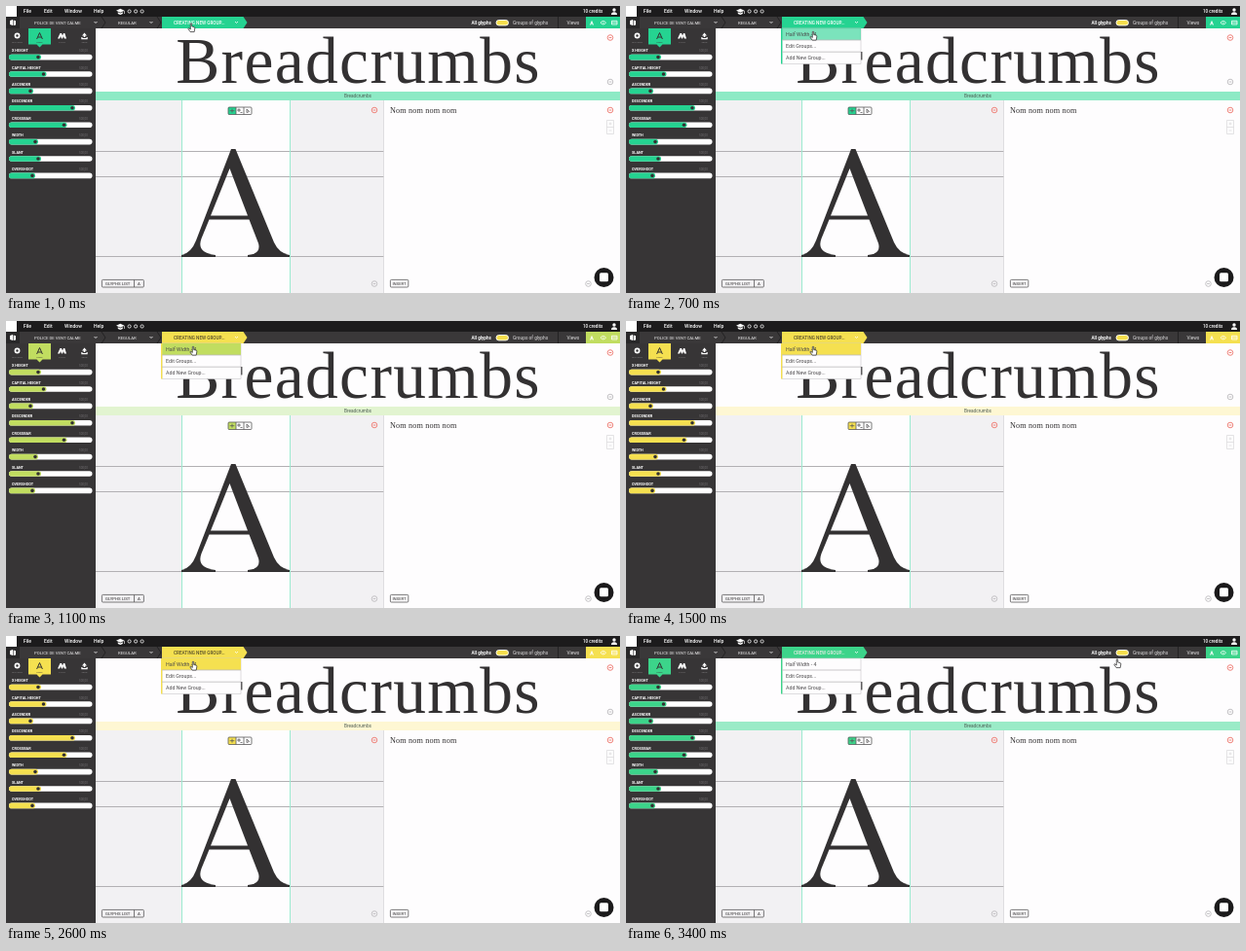
Write an HTML page that moves like this. It is 630 by 295 pixels and loops after 3500 ms.

```html
<!DOCTYPE html>
<html lang="en">
<head>
<meta charset="utf-8">
<title>Font editor</title>
<style>
html, body { margin: 0; width: 100%; height: 100%; overflow: hidden; background: #fefdfe; }
svg { display: block; width: 630px; height: 295px; font-family: Roboto, Arial, sans-serif; font-size: 4.8px; }
.serif { font-family: "Liberation Serif", "Times New Roman", serif; }
.white { fill: #fff; }
.bold { font-weight: 700; }
.caps { font-size: 4.3px; }
.theme { fill: var(--theme); }
.tab { fill: var(--tab); }
.band { fill: var(--band); }
.line { fill: none; stroke: #fff; stroke-width: .8; }
.ink { fill: none; stroke: #5a585a; stroke-width: .8; }
.guide { stroke: #b2b0b3; stroke-width: 1; }
.edge { stroke: #9debd0; stroke-width: 1; }
</style>
</head>
<body>
<svg viewBox="0 0 630 295" fill="#333132">
  <!-- Preview and glyph panes -->
  <rect x="92" y="23" width="538" height="272" fill="#fefdfe"/>
  <text class="serif" x="174.2" y="78.7" font-size="67.5" letter-spacing="1.35">Breadcrumbs</text>
  <rect class="band" x="92" y="88" width="538" height="9"/>
  <text x="361" y="94.1" text-anchor="middle" font-size="4.7" fill="#4a5a50">Breadcrumbs</text>
  <rect x="92" y="97" width="296" height="198" fill="#f2f1f3"/>
  <rect x="180" y="97" width="112" height="198" fill="#fefdfe"/>
  <path class="guide" d="M92 149.5H388M92 175.5H388M92 257.5H388"/>
  <path class="edge" d="M180.5 97V295M291.5 97V295"/>
  <path d="M387.5 97V295" stroke="#dad8db" stroke-width=".8"/>
  <path fill-rule="evenodd" d="M231 147H235.5L275 243Q280 254 291 256V258H248V256Q262 255 259 244L249.5 219.5H208.5L200.5 239Q195 254 215 256V258H180V256Q190 254 195 241ZM210 215.5H248L229.5 167Z"/>
  <text class="serif" x="394" y="110.3" font-size="8.2" letter-spacing=".15">Nom nom nom nom</text>

  <!-- Pane controls -->
  <rect class="theme" x="228" y="104" width="8" height="7.5"/>
  <path class="ink" d="M229 104H251Q252 104 252 105V110.5Q252 111.5 251 111.5H229Q228 111.5 228 110.5V105Q228 104 229 104M236 104V111.5M244 104V111.5M229.7 107.7H234.3M232 105.8V109.6M238 106.2H240V108H238ZM240.5 109.5H242.5M247 106V109.5L249.5 108.5L247 106"/>
  <g id="badges"></g>
  <path fill="none" stroke="#d9d7da" stroke-width=".7" d="M616.5 117.5H623.5V131.5H616.5ZM616.5 124.5H623.5M618.5 121H621.5M620 119.5V122.5M618.5 128H621.5"/>
  <rect class="ink" x="98.4" y="281.4" width="43" height="7.6" rx="1"/>
  <path class="ink" d="M131.5 281.4V289"/>
  <text class="caps" x="102" y="286.8">GLYPHS LIST</text>
  <text class="caps" x="135" y="286.8">A</text>
  <rect class="ink" x="394.4" y="281.4" width="18.4" height="7.6" rx="1"/>
  <text class="caps" x="396.4" y="286.8">INSERT</text>
  <circle cx="613.5" cy="279" r="10" fill="#1b1a1b"/>
  <rect class="white" x="609" y="274.3" width="9" height="9" rx="1.5"/>

  <!-- Sidebar -->
  <rect y="23" width="92" height="272" fill="#373536"/>
  <path class="theme" d="M23 23H46V39.5H37.5L34.5 42.5L31.5 39.5H23Z"/>
  <circle cx="11.5" cy="30.5" r="2.1" fill="none" stroke="#fff" stroke-width="1.7"/>
  <path d="M31.6 34L34.5 27.5L37.4 34M32.7 32H36.3" fill="none" stroke="#333132"/>
  <path class="white" d="M53 33.5L55.5 28H57L58 30.5L59 28H60.3L62 33.5H59.8L59 31L58 33.5H57L56 31L55.2 33.5Z"/>
  <path class="white" d="M80.5 27.5L83 30.5H81.3V32H79.7V30.5H78ZM77.3 32H78.5V33H82.5V32H83.7V34.2H77.3Z"/>
  <g font-size="2.4" text-anchor="middle" fill="#858385">
    <text x="11.5" y="37.5">SETTINGS</text><text x="34.5" y="37.5" fill="#333132">FUNC</text>
    <text x="57.5" y="37.5">STYLE</text><text x="80.5" y="37.5">SERIF</text>
  </g>
  <g id="sliders"></g>

  <!-- Top bars -->
  <rect width="630" height="11" fill="#1c1b1c"/>
  <rect class="white" width="11" height="11"/>
  <g class="white" font-size="5" font-weight="500">
    <text x="18" y="7.3">File</text><text x="39" y="7.3">Edit</text>
    <text x="60" y="7.3">Window</text><text x="90" y="7.3">Help</text>
    <text x="592" y="7.3" font-size="4.6">10 credits</text>
  </g>
  <path class="white" d="M113 4.8L117.3 2.8L121.6 4.8L117.3 6.8ZM114.8 6.3L117.3 7.5L119.8 6.3V8L117.3 9L114.8 8ZM121 5H121.6V8H121Z"/>
  <path class="line" d="M125 5.5a1.6 1.6 0 1 0 3.2 0a1.6 1.6 0 1 0-3.2 0M131.5 5.5a1.6 1.6 0 1 0 3.2 0a1.6 1.6 0 1 0-3.2 0M138 5.5a1.6 1.6 0 1 0 3.2 0a1.6 1.6 0 1 0-3.2 0"/>
  <circle class="white" cx="624" cy="4" r="1.7"/>
  <path class="white" d="M621 9Q621 6.2 624 6.2T627 9Z"/>
  <rect y="11" width="630" height="12" fill="#3a3839"/>
  <rect y="11" width="14" height="12" fill="#292829"/>
  <path class="white" d="M4 15L7 14V20L4 19ZM7.6 14.5L10 15.2V19.4L7.6 20Z"/>
  <path d="M98 11L102 17L98 23M155 11L159 17L155 23M566.5 11V23" fill="none" stroke="#232223"/>
  <path class="line" d="M90.5 16L92 17.5L93.5 16M147.5 16L149 17.5L150.5 16"/>
  <g class="caps" fill="#efeeef">
    <text x="29" y="18.6">POLICE DE VENT CALME</text>
    <text x="115" y="18.6">REGULAR</text>
  </g>
  <path class="tab" d="M160 11H243.5L247.5 17L243.5 23H160Z"/>
  <text id="tabText" x="172" y="18.6" font-size="4.65" font-weight="500">CREATING NEW GROUP...</text>
  <path class="line" d="M235 16L236.5 17.5L238 16"/>
  <text class="white bold" x="477.5" y="18.6" font-size="4.6">All glyphs</text>
  <rect x="503" y="14.5" width="12.5" height="5.4" rx="2.7" fill="#f6df4d" stroke="#fff" stroke-width=".9"/>
  <text x="520" y="18.6" fill="#e2e1e2">Groups of glyphs</text>
  <text x="575.5" y="18.6" fill="#e2e1e2">Views</text>
  <rect class="theme" x="595" y="11" width="35" height="12"/>
  <path class="white" d="M599 19.5L601 14.8L603 19.5H601.8L601 17.5L600.2 19.5Z"/>
  <path class="line" d="M610 17.2Q612.8 13.8 615.6 17.2Q612.8 20.6 610 17.2M612.2 17.2H613.4M621.5 15.3H627V19H621.5ZM621.5 17.1H627"/>

  <!-- Group menu -->
  <g id="menu">
    <rect x="160" y="23" width="81" height="36.5" fill="#fefdfe" stroke="#c9c7ca" stroke-width=".6"/>
    <rect id="hover" class="theme" x="160" y="23" width="81" height="12"/>
    <rect class="tab" x="159" y="23" width="1.4" height="36.5"/>
    <path d="M160 35H241M160 47.2H241" stroke="#bbb9bc" stroke-width=".8"/>
    <g font-size="5.25" fill="#4a484a">
      <text x="164" y="31">Half Width - 4</text>
      <text x="164" y="43">Edit Groups...</text>
      <text x="164" y="55">Add New Group...</text>
    </g>
  </g>
  <path id="hand" fill="#fff" stroke="#222" stroke-width=".7" stroke-linejoin="round" d="M-.7 0Q0-.8 .7 0V3L3 3.6Q4 3.9 3.8 5L3.2 8.6H-.9L-3 5.6Q-3.2 4.6-2.2 4.8L-.7 6Z"/>
</svg>
<script>
const $ = id => document.getElementById(id);
const LOOP = 3500;
const GREEN = [37, 211, 145], YELLOW = [245, 224, 80];
const BAND_GREEN = [141, 234, 197], BAND_YELLOW = [254, 247, 211];
const WHITE = [255, 255, 255], DARK = [85, 76, 42];

const sliders = [
  ["X HEIGHT", 33], ["CAPITAL HEIGHT", 38.5], ["ASCENDER", 25], ["DESCENDER", 68],
  ["CROSSBAR", 59.5], ["WIDTH", 30], ["SLANT", 33], ["OVERSHOOT", 27]
];
$("sliders").innerHTML = sliders.map(([name, x], i) => {
  const y = 52.6 + i * 17.4;
  return `<text class="white bold" x="6" y="${y - 5.4}" font-size="3.8">${name}</text>
    <text x="84" y="${y - 5.4}" font-size="3" text-anchor="end" fill="#6f6d6f">500,00</text>
    <rect class="white" x="3" y="${y - 2.8}" width="85.5" height="5.6" rx="2.8"/>
    <rect class="theme" x="3" y="${y - 2.8}" width="${x}" height="5.6" rx="2.8"/>
    <circle cx="${x}" cy="${y}" r="1.8"/>`;
}).join("");

const badge = (x, y, color) =>
  `<circle cx="${x}" cy="${y}" r="2.8" fill="none" stroke="${color}"/>
   <path d="M${x - 1.4} ${y}h2.8" stroke="${color}"/>`;
$("badges").innerHTML =
  [[620, 32.5], [378, 107], [620, 107]].map(([x, y]) => badge(x, y, "#f0867e")).join("") +
  [[620, 78], [378, 285.5], [597.5, 285.5]].map(([x, y]) => badge(x, y, "#c4c2c5")).join("");

// Cursor tip: time, x, y
const path = [
  [0, 190, 18], [300, 190, 18], [600, 192, 26.5], [2620, 192, 26.5],
  [2950, 510, 15], [3220, 510, 15], [3390, 504, 24], [LOOP, 504, 24]
];

const mix = (a, b, p) => a + (b - a) * p;
const rgb = (a, b, p) => `rgb(${a.map((v, i) => Math.round(mix(v, b[i], p)))})`;
const ramp = (t, from, length) => Math.min(1, Math.max(0, (t - from) / length));
const easeOut = p => 1 - (1 - p) ** 2;
const smooth = p => p * p * (3 - 2 * p);

function cursorAt(t) {
  const i = path.findIndex(k => k[0] > t);
  const [t0, x0, y0] = path[i - 1], [t1, x1, y1] = path[i];
  const p = smooth((t - t0) / (t1 - t0));
  return [mix(x0, x1, p), mix(y0, y1, p)];
}

function draw(now) {
  const t = now % LOOP;
  const back = easeOut(ramp(t, 3200, 300));
  const theme = easeOut(ramp(t, 850, 500)) - back;
  const tab = easeOut(ramp(t, 800, 300)) - back;
  const style = document.documentElement.style;
  style.setProperty("--theme", rgb(GREEN, YELLOW, theme));
  style.setProperty("--tab", rgb(GREEN, YELLOW, tab));
  style.setProperty("--band", rgb(BAND_GREEN, BAND_YELLOW, theme));
  $("tabText").style.fill = rgb(WHITE, DARK, tab);
  $("menu").style.visibility = t < 250 ? "hidden" : "visible";
  $("hover").style.opacity = ramp(t, 550, 250) - ramp(t, 2680, 120);
  $("hand").setAttribute("transform", `translate(${cursorAt(t)})`);
}

let start;
function tick(now) {
  start ??= now;
  draw(Math.max(0, now - start));
  requestAnimationFrame(tick);
}
draw(0);
requestAnimationFrame(tick);
</script>
</body>
</html>
```
